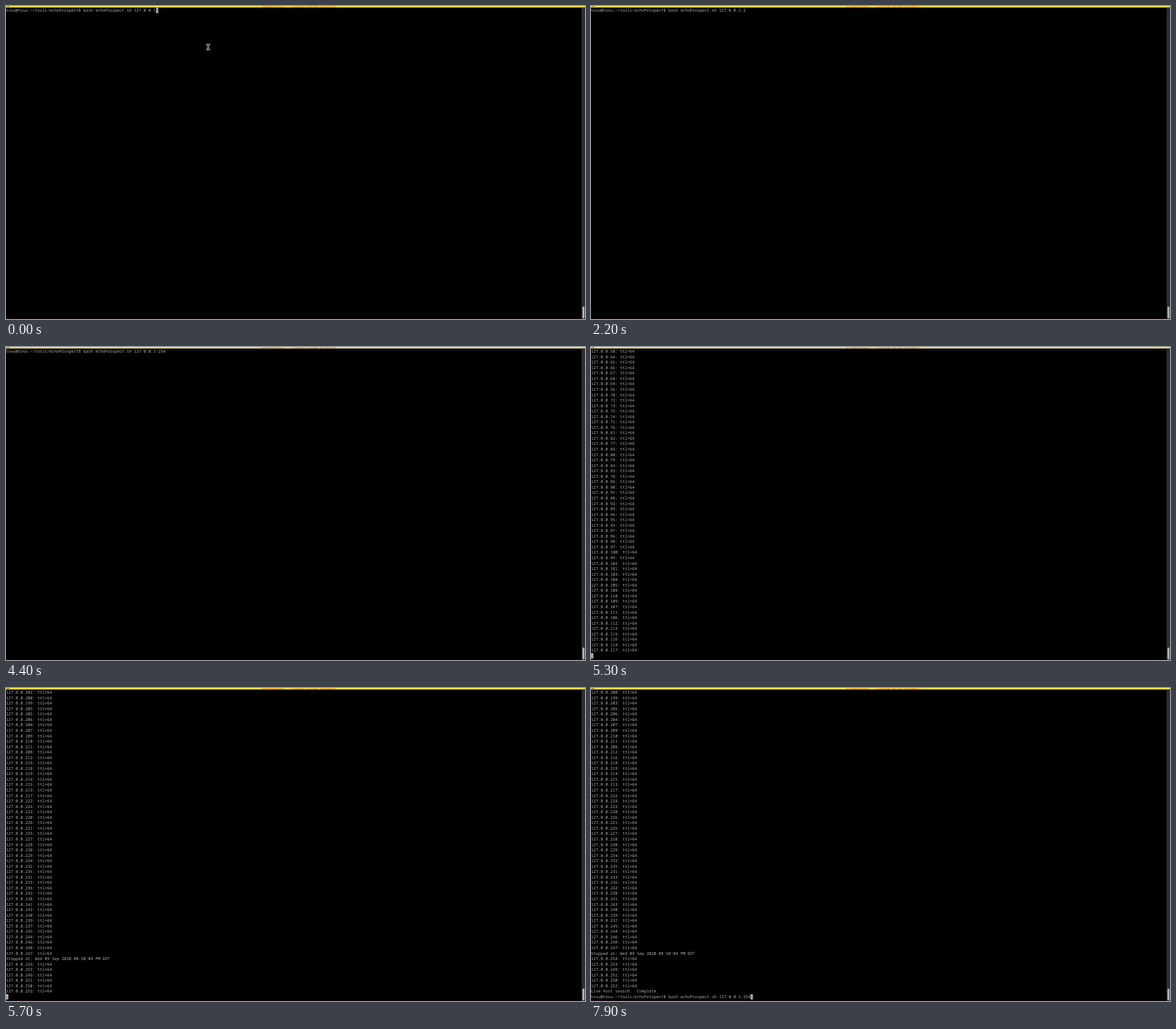
An HTML page for the animation above (8000 ms loop, 1018x550 px).

```html
<!DOCTYPE html>
<html lang="en">
<head>
<meta charset="utf-8">
<title>Terminal</title>
<style>
  html, body { margin: 0; width: 100%; height: 100%; overflow: hidden; background: #000; }
  svg { display: block; width: 1018px; height: 550px; }
  text {
    font: 7.083px "Noto Sans Mono", "DejaVu Sans Mono", monospace;
    font-variant-ligatures: none;
    text-rendering: geometricPrecision;
    white-space: pre;
    fill: #b4b4b4;
  }
  .title { fill: #d4581c; }

  .at { animation: 8s step-end infinite; }
  #typing  { animation-name: typing; }
  #early   { animation-name: early; }
  #late    { animation-name: late; }
  #done    { animation-name: done; }
  #pointer { animation-name: pointer; }
  #recall  { animation-name: recall; }
  .key0 { animation-name: key0; }
  .key1 { animation-name: key1; }
  .key2 { animation-name: key2; }
  .key3 { animation-name: key3; }
  #cursor { animation-name: cursor; }

  @keyframes typing  { 0% { opacity: 1 } 66.25%, 100% { opacity: 0 } }
  @keyframes early   { 0% { opacity: 0 } 66.25% { opacity: 1 } 68.75%, 100% { opacity: 0 } }
  @keyframes late    { 0% { opacity: 0 } 68.75% { opacity: 1 } 81.25%, 100% { opacity: 0 } }
  @keyframes done    { 0% { opacity: 0 } 81.25%, 100% { opacity: 1 } }
  @keyframes pointer { 0% { opacity: 1 } 10%, 100% { opacity: 0 } }
  @keyframes recall  { 0% { opacity: 0 } 98.75%, 100% { opacity: 1 } }
  @keyframes key0 { 0% { opacity: 0 } 10%, 100% { opacity: 1 } }
  @keyframes key1 { 0% { opacity: 0 } 20%, 100% { opacity: 1 } }
  @keyframes key2 { 0% { opacity: 0 } 33.75%, 100% { opacity: 1 } }
  @keyframes key3 { 0% { opacity: 0 } 47.5%, 100% { opacity: 1 } }

  /* Blinking block: column 4.25px, row 9.55px */
  @keyframes cursor {
    0%     { opacity: 1; transform: translate(263.5px, 0) }
    2.5%   { opacity: 0; transform: translate(263.5px, 0) }
    10%    { opacity: 1; transform: translate(267.75px, 0) }
    17.5%  { opacity: 0; transform: translate(267.75px, 0) }
    20%    { opacity: 1; transform: translate(272px, 0) }
    27.5%  { opacity: 0; transform: translate(272px, 0) }
    33.75% { opacity: 1; transform: translate(276.25px, 0) }
    38.75% { opacity: 0; transform: translate(276.25px, 0) }
    47.5%  { opacity: 1; transform: translate(280.5px, 0) }
    55%    { opacity: 0; transform: translate(280.5px, 0) }
    66.25% { opacity: 1; transform: translate(0, 534.8px) }
    68.75% { opacity: 0; transform: translate(0, 534.8px) }
    71.25% { opacity: 1; transform: translate(0, 534.8px) }
    81.25% { opacity: 0; transform: translate(0, 534.8px) }
    87.5%  { opacity: 1; transform: translate(136px, 534.8px) }
    96.25% { opacity: 0; transform: translate(136px, 534.8px) }
    98.75%, 100% { opacity: 1; transform: translate(280.5px, 534.8px) }
  }
</style>
</head>
<body>
<svg viewBox="0 0 1018 550">
  <rect width="1018" height="550"/>
  <rect y="549" width="1018" height="1" fill="#140004"/>

  <rect width="1018" height="2.6" fill="#f6e44c"/>
  <rect x="1.5" width="4.5" height="1" fill="#4a4a3c"/>
  <text class="title" x="448.5" y="1.6">tovu@tovu: ~/tools/echoProspect</text>

  <rect x="1012" y="2.6" width="6" height="547.4" fill="#2b2f31"/>
  <rect x="1013.5" y="528" width="3.5" height="21" rx="1.7" fill="#b4b4b2"/>

  <g id="typing" class="at"></g>
  <g id="early" class="at"></g>
  <g id="late" class="at"></g>
  <g id="done" class="at"><g id="recall" class="at"></g></g>

  <rect id="cursor" class="at" y="3.1" width="4.2" height="9.55" fill="#aaa"/>

  <g id="pointer" class="at" fill="none" stroke-linecap="square">
    <path id="beam" d="M353.7 67.7H357.3M355.5 67.7V76.5M353.7 76.5H357.3" stroke="#e8e8e8" stroke-width="2.6"/>
    <path d="M353.7 67.7H357.3M355.5 67.7V76.5M353.7 76.5H357.3" stroke="#000" stroke-width=".9"/>
  </g>
</svg>
<script>
  const COL = 4.25, ROW = 9.55, BASE = 10.1, LAST = 56;
  const prompt = 'tovu@tovu:~/tools/echoProspect$ ';
  const command = 'bash echoProspect.sh 127.0.0.1';
  const range = '-254';

  function print(id, row, str, col = 0, cls = '') {
    const t = document.createElementNS('http://www.w3.org/2000/svg', 'text');
    t.setAttribute('x', col * COL);
    t.setAttribute('y', BASE + row * ROW);
    if (cls) t.setAttribute('class', cls);
    t.textContent = str;
    document.getElementById(id).appendChild(t);
  }

  const printAll = (id, lines) => lines.forEach((line, row) => print(id, row, line));
  const replies = hosts => hosts.split(' ').map(n => `127.0.0.${n}: ttl=64`);

  const firstHosts = replies(
    '58 64 65 66 67 68 69 56 70 72 73 75 74 71 76 81 82 77 85 80 79 84 83 78 86 ' +
    '90 91 88 92 89 94 95 93 87 96 98 97 100 99 102 101 103 104 105 108 110 109 ' +
    '107 111 106 112 113 115 116 114 117');

  const lastHosts = [
    ...replies(
      '202 200 199 203 205 206 204 207 209 210 211 208 212 216 218 219 214 215 ' +
      '213 217 222 224 223 220 226 221 225 227 228 230 229 234 232 235 231 233 ' +
      '236 242 238 241 243 240 239 237 245 244 246 248 247'),
    'Stopped at: Wed 09 Sep 2020 08:50:04 PM EDT',
    ...replies('254 253 249 251 250 252')
  ];

  const typedCol = prompt.length + command.length;
  print('typing', 0, prompt + command);
  [...range].forEach((ch, i) => print('typing', 0, ch, typedCol + i, 'at key' + i));

  printAll('early', firstHosts);
  printAll('late', lastHosts);
  printAll('done', [...lastHosts.slice(1), 'Live host search:  Complete', prompt]);
  print('recall', LAST, command + range, prompt.length);
</script>
</body>
</html>
```
